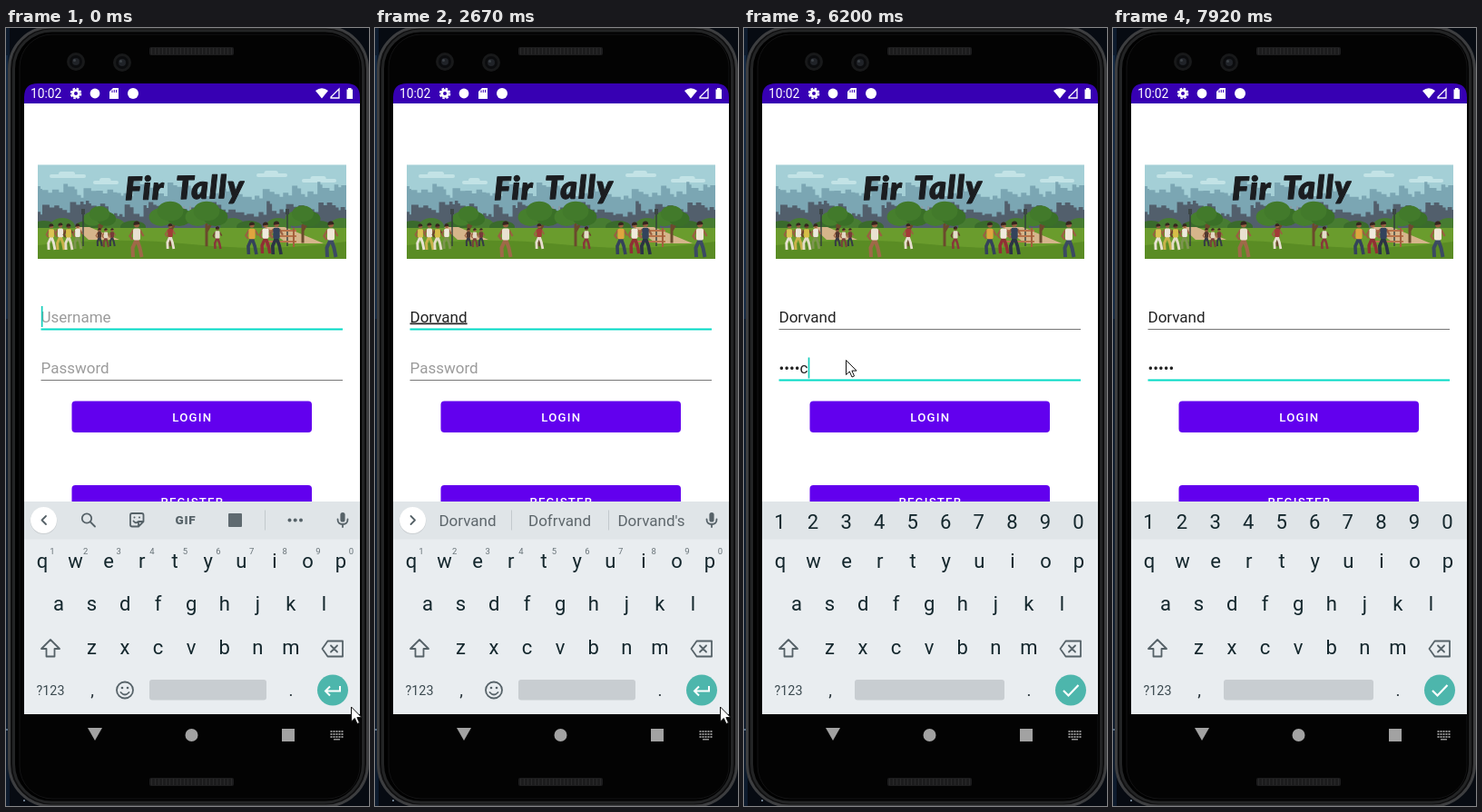
Write an HTML page that moves like this. It is 400 px wide and 856 px high and loops after 8 s.

```html
<!DOCTYPE html>
<html lang="en">
<head>
<meta charset="utf-8">
<title>Login screen</title>
<style>
  html, body { margin: 0; width: 100%; height: 100%; overflow: hidden; background: #05080d; }
  svg { display: block; width: 100vw; height: 100vh; font-family: Roboto, sans-serif; }
  text { white-space: pre; }
  .mid { text-anchor: middle; }
  .key { font-size: 22px; fill: #14272d; }
  .sup { font-size: 9.5px; fill: #687378; }
  .field { font-size: 17px; fill: #212121; }
  .hint { fill: #9b9b9b; }
  .word { font-size: 17px; fill: #5d666b; }
  .btn { font-size: 13.2px; font-weight: 500; letter-spacing: 1.2px; fill: #fff; }
  .line { fill: none; stroke: #566268; stroke-width: 1.8; stroke-linejoin: round; stroke-linecap: round; }
  .composing { text-decoration: underline; text-decoration-thickness: 1px; text-underline-offset: 1.5px; text-decoration-skip-ink: none; }
</style>
</head>
<body>
<svg id="stage" viewBox="0 0 400 856" preserveAspectRatio="none"></svg>
<script>
const LOOP = 8000;
const svg = document.getElementById('stage');

const rect = (x, y, w, h, fill, rx = 0, extra = '') =>
  `<rect x="${x}" y="${y}" width="${w}" height="${h}" rx="${rx}" fill="${fill}" ${extra}/>`;
const circle = (x, y, r, fill, extra = '') => `<circle cx="${x}" cy="${y}" r="${r}" fill="${fill}" ${extra}/>`;
const ellipse = (x, y, rx, ry, fill) => `<ellipse cx="${x}" cy="${y}" rx="${rx}" ry="${ry}" fill="${fill}"/>`;
const path = (d, fill, extra = '') => `<path d="${d}" fill="${fill}" ${extra}/>`;
const line = d => `<path class="line" d="${d}"/>`;
const text = (x, y, s, cls, extra = '') => `<text x="${x}" y="${y}" class="${cls}" ${extra}>${s}</text>`;
const group = (id, body) => `<g id="${id}">${body}</g>`;

function seeded(seed) {
  return () => (seed = (seed * 16807) % 2147483647) / 2147483647;
}

function phone() {
  const grille = y => {
    let s = rect(158, y, 93, 9, '#1c1c1d', 2);
    for (let x = 160; x < 250; x += 4) s += rect(x, y + 1, 1, 7, '#29292a');
    return s;
  };
  const camera = (x, y) =>
    circle(x, y, 10, '#18191a') + circle(x, y, 7, '#0b0c0e') + circle(x, y, 4, '#202328') +
    circle(x - 1.5, y - 1.5, 1.5, '#3c4147');
  const keys = [0, 1, 2].map(r => [0, 1, 2, 3, 4].map(c =>
    rect(357.5 + c * 3, 773 + r * 3, 2, 2, '#8f8f8f')).join('')).join('');
  return rect(0, 0, 400, 856, '#070b12') +
    rect(0, 0, 4, 856, '#0d1b2d') + rect(0, 30, 2, 290, '#142a45') +
    circle(20, 850, 1, '#8fa3b5') + circle(1, 772, 1, '#6f88a0') +
    rect(3.5, -1, 395, 857, '#0e0e0f', 46, 'stroke="#3d3e40" stroke-width="3"') +
    rect(8.5, 3, 385, 849, '#000', 42, 'stroke="#232425" stroke-width="3"') +
    rect(15, 7, 375, 841, '#030303', 36, 'stroke="#131314"') +
    grille(21) + grille(825) + camera(77, 37) + camera(128, 38) +
    path('M90 770H106L98 784Z', '#a2a2a2') + circle(204.5, 778, 7, '#a2a2a2') +
    rect(304, 771, 14, 14, '#a2a2a2') + keys + rect(361, 782, 7, 1.5, '#8f8f8f');
}

function statusBar() {
  return path('M20 83V76Q20 61 35 61H375Q390 61 390 76V83Z', '#3700b3') +
    text(27, 77, '10:02', '', 'font-size="13.8" fill="#fff"') +
    circle(77, 72, 3.4, 'none', 'stroke="#fff" stroke-width="2.8"') +
    circle(77, 72, 5.4, 'none', 'stroke="#fff" stroke-width="1.8" stroke-dasharray="2.6 1.64"') +
    circle(98, 72, 5.4, '#fff') +
    path('M118 66H124V78H114V70Z', '#fff') +
    path('M117 68.5V71M119.3 68V71M121.6 68V71', 'none', 'stroke="#3700b3"') +
    circle(140, 72, 6, '#fff') +
    path('M341 69Q348 63.5 355 69L348 77.5Z', '#fff') +
    path('M358 77V76L367 67V77Z', 'none', 'stroke="#fff" stroke-width="1.3"') +
    path('M375.5 67.5H377V66H380.5V67.5H382V78H375.5Z', '#fff');
}

function skyline(seed, top, vary, fill) {
  const rnd = seeded(seed);
  let d = 'M35 226', x = 35;
  while (x < 375) {
    const w = 5 + rnd() * 9, y = top + rnd() * vary;
    d += `L${x} ${y}H${x + w * 0.6}V${y + 3}H${x + w}`;
    x += w;
  }
  return path(d + 'V226Z', fill);
}

// Slim figure in mid-stride, sized in eighths of its height.
function person(x, foot, h, shirt, legs, skin = '#9a6041') {
  const u = h / 8;
  return path(`M${x} ${foot - u * 4}L${x - u * 0.9} ${foot - u * 2}L${x - u * 0.8} ${foot}M${x} ${foot - u * 4}L${x + u * 0.7} ${foot - u * 2}L${x + u * 1.1} ${foot}`,
      'none', `stroke="${legs}" stroke-width="${u * 0.8}"`) +
    path(`M${x - u * 0.7} ${foot - u * 6}L${x - u * 1.5} ${foot - u * 4.6}L${x - u * 0.9} ${foot - u * 3.8}M${x + u * 0.7} ${foot - u * 6}L${x + u * 1.5} ${foot - u * 4.6}`,
      'none', `stroke="${skin}" stroke-width="${u * 0.5}"`) +
    rect(x - u * 0.8, foot - u * 6.3, u * 1.6, u * 2.6, shirt, u * 0.4) +
    circle(x, foot - u * 7.1, u * 0.6, skin) +
    path(`M${x - u * 0.7} ${foot - u * 7}A${u * 0.7} ${u * 0.8} 0 0 1 ${x + u * 0.7} ${foot - u * 7.2}Z`, '#34251f');
}

function tree(x, y, r) {
  return path(`M${x} ${y}V${y + r * 1.9}M${x} ${y + r}L${x + r * 0.5} ${y + 2}`, 'none', 'stroke="#6b4a2c" stroke-width="3"') +
    ellipse(x - r * 0.55, y + 2, r * 0.75, r * 0.55, '#467f2d') + ellipse(x + r * 0.55, y + 2, r * 0.75, r * 0.55, '#3a7027') +
    ellipse(x, y - r * 0.25, r * 0.8, r * 0.6, '#427a2b');
}

function banner() {
  const lamp = x => path(`M${x} 203V240`, 'none', 'stroke="#333d3d" stroke-width="1.4"') + rect(x - 2, 199, 4, 6, '#3c4646');
  const rail = y => path(`M284 ${y}H320`, 'none', 'stroke="#b8734a" stroke-width="2"');
  const cloud = (x, y, w) => rect(x, y, w, 4, '#c3e3e6', 2) + rect(x + w * 0.25, y - 3, w * 0.45, 5, '#c3e3e6', 2.5);
  const hedge = [42, 62, 90, 118, 140, 250, 268, 300, 345, 370]
    .map((x, i) => ellipse(x, 219, 14, 7 + i % 2 * 3, i % 2 ? '#477c31' : '#3a6b2c')).join('');
  return '<clipPath id="art"><rect x="35" y="150.5" width="340" height="103.5"/></clipPath><g clip-path="url(#art)">' +
    rect(35, 150, 340, 76, '#a4cfd6') +
    cloud(48, 161, 40) + cloud(96, 168, 28) + cloud(276, 160, 34) + cloud(326, 166, 38) +
    skyline(71, 168, 18, '#7ba6b3') + skyline(29, 190, 15, '#525f6c') +
    hedge + rect(35, 220, 340, 35, '#6a9c2d') +
    path('M76 219H92L125 233H91ZM285 219H307L350 237H310Z', '#d6b58b') +
    path('M35 239Q120 229 205 238T375 235V254H35Z', '#5a8c24') +
    rect(195, 196, 2, 19, '#8a9aa4') + rect(202, 196, 2, 19, '#8a9aa4') +
    tree(103, 208, 14) + tree(181, 206, 18) + tree(221, 206, 18) + tree(327, 208, 15) +
    lamp(85) + lamp(310) + rail(223) + rail(229) + rail(235) +
    path('M287 220V241M317 220V241', 'none', 'stroke="#a45f3d" stroke-width="2"') +
    person(50, 244, 29, '#dcc453', '#e8e2d2') + person(60, 244, 30, '#ece6d8', '#c9b24a') +
    person(69, 244, 29, '#d8bd48', '#e4dcc6', '#6e432e') + person(79, 243, 28, '#eee9dd', '#7d9450') +
    person(103, 240, 20, '#51372f', '#353b45') + person(110, 241, 21, '#e2d8c4', '#793f3a') +
    person(117, 240, 20, '#783a39', '#343b45') +
    person(144, 252, 40, '#e9e0d0', '#9f6948') + person(181, 243, 28, '#a33b38', '#e7decf') +
    person(233, 243, 25, '#e5dccb', '#87383a', '#6e432e') +
    person(271, 249, 36, '#e0a53f', '#34425a') + person(286, 248, 35, '#f0eadd', '#8f3034') +
    person(298, 249, 37, '#33435c', '#2b3444') + person(358, 252, 40, '#f0e7d6', '#3b4a62') + '</g>' +
    `<g transform="rotate(-1 198 176)" font-family="Lato, sans-serif" font-weight="900" font-style="italic" font-size="35"
      fill="#1b1d20" stroke="#1b1d20" stroke-width="1" stroke-linejoin="round" letter-spacing="1.2">` +
    text(131, 188, 'Fir', '') + text(187, 188, 'Tally', '') + '</g>';
}

function form() {
  const button = (y, label) => rect(72.5, y, 264.5, 34.5, '#6200ee', 4) +
    text(205.3, y + 22.5, label, 'btn mid');
  return rect(20, 83, 370, 672, '#fff') + banner() +
    text(38.5, 323.5, 'Username', 'field hint', 'id="userHint"') + text(38.5, 323.5, '', 'field', 'id="user"') +
    text(38.5, 380, 'Password', 'field hint', 'id="passHint"') + text(38.5, 380, '', 'field', 'id="pass"') +
    rect(38.5, 330.5, 332.5, 2, '#03dac5', 0, 'id="userLine"') + rect(38.5, 387, 332.5, 1, '#777', 0, 'id="passLine"') +
    rect(39, 306, 1.7, 23, '#14cdbb', 0, 'id="caret"') +
    button(410.5, 'LOGIN') +
    '<clipPath id="press"><rect x="72.5" y="410.5" width="264.5" height="34.5" rx="4"/></clipPath>' +
    '<circle id="ripple" cx="147" cy="423" r="0" fill="#fff" opacity="0" clip-path="url(#press)"/>' +
    button(503, 'REGISTER');
}

const row = (chars, x, y, step = 36.55) =>
  [...chars].map((c, i) => text(x + i * step, y, c, 'key mid')).join('');

function keyboard() {
  const sups = [...'1234567890'].map((c, i) => text(51 + i * 36.6, 578.5, c, 'sup mid')).join('');
  const divider = x => rect(x, 530.5, 1, 22, '#c3c9cd');
  const tools = line('M44 537L39.5 541.5L44 546') +
    circle(89, 539.5, 5.2, 'none', 'class="line"') + line('M93 543.5L98 548.5') +
    line('M139 534H149.5Q151.5 534 151.5 536V543L146 548.5H139Q137 548.5 137 546.5V536Q137 534 139 534ZM151 543H146V548M140.5 542.5Q143 545.5 145 543.5') +
    circle(141.5, 538.5, 1, '#566268') + circle(147, 538.5, 1, '#566268') +
    text(198, 546, 'GIF', 'mid', 'font-size="13.5" font-weight="900" letter-spacing=".7" fill="#566268"') +
    rect(245, 534, 15, 15, '#5f6a70', 1) + divider(285) +
    [312.5, 318.7, 325].map(x => circle(x, 541.5, 2, '#566268')).join('');
  const words = line('M39.5 537L44 541.5L39.5 546') + divider(150) + divider(257) +
    [102, 203.5, 304.5].map((x, i) => text(x, 548, '', 'word mid', `id="word${i}"`)).join('');
  const mic = rect(368.4, 533, 5.2, 10.5, '#566268', 2.6) + line('M365.5 540.5Q365.5 546 371 546T376.5 540.5M371 546V549');
  const emoji = circle(131, 728.5, 9, 'none', 'class="line"') + circle(128, 726, 1.3, '#566268') +
    circle(134, 726, 1.3, '#566268') + line('M126.5 731Q131 736 135.5 731');
  return rect(20, 521, 370, 234, '#e9edf0') + rect(20, 521, 370, 41.5, '#e0e5e8') +
    group('strip', circle(41.5, 542.3, 14.8, '#00000018') + circle(41.5, 541.5, 14.5, '#fff') +
      group('tools', tools) + group('words', words) + mic) +
    group('digits', row('1234567890', 39.5, 550.5)) +
    row('qwertyuiop', 40, 593.5) + row('asdfghjkl', 58, 641) + row('zxcvbnm', 94.5, 688.5) +
    line('M49 673L59 683H53.5V691.5H44.5V683H39Z') +
    line('M354.5 674.5H371V691.5H354.5L348.5 683ZM358 679.5L365 686.5M365 679.5L358 686.5') +
    text(49, 733.5, '?123', 'mid', 'font-size="14.3" fill="#3c4a50"') +
    text(95, 735, ',', 'mid', 'font-size="19" fill="#263238"') + text(314, 735, '.', 'mid', 'font-size="19" fill="#263238"') +
    rect(158, 717, 129, 22.5, '#c8cdd1', 3, 'id="space"') + circle(360, 728.5, 17, '#4db6ac') +
    group('plain', sups + emoji +
      path('M368 724V729.5H352M357 724.5L352 729.5L357 734.5', 'none', 'stroke="#fff" stroke-width="2"')) +
    path('M352 729L357.5 734.5L368.5 723', 'none', 'stroke="#fff" stroke-width="2.2" id="check"');
}

const pointer = path('M0 0V16L3.8 12.5L6.5 18.5L9 17.4L6.4 11.6H11.5Z', '#fff',
  'stroke="#111" stroke-linejoin="round" id="pointer"');

svg.innerHTML = phone() + form() + statusBar() + keyboard() + pointer;
const el = {};
svg.querySelectorAll('[id]').forEach(n => el[n.id] = n);

const typed = [[0, ''], [450, 'D'], [840, 'Do'], [1110, 'Dor'], [1390, 'Dorv'], [1640, 'Dorva'], [1950, 'Dorvan'], [2100, 'Dorvand']];
const suggestions = [[0, ['', '', '']], [570, ['D', 'Do', 'Did']], [840, ['Do', 'Don’t', 'Dot']],
  [1110, ['Dor', 'Door', 'Dorm']], [1390, ['Dorv', 'Dorvand', 'Dorvs']], [1640, ['Dorva', 'Dorvand', 'Dorvay']],
  [2100, ['Dorvand', 'Dofrvand', "Dorvand's"]]];
const secret = [[0, ''], [5110, 'm'], [5380, '•a'], [5680, '••n'], [6080, '•••o'], [6200, '••••c'], [7660, '•••••']];
const blink = [[0, 1], [2670, 0], [3130, 1], [3740, 0], [4190, 1], [4710, 0], [5110, 1], [6790, 0], [7080, 1], [7790, 0]];
const mouse = [[0, [380.5, 747]], [3280, [330, 650]], [3430, [205, 450]], [3890, [150, 400]], [4040, [112.5, 365.5]],
  [7080, [128, 394]], [7230, [142.5, 419.5]], [7920, null]];
const ripple = [[0, [0, 0]], [7530, [45, 0.2]], [7660, [130, 0.22]], [7790, [230, 0.12]], [7920, [0, 0]]];

function at(steps, t) {
  let value;
  for (const [start, v] of steps) if (t >= start) value = v;
  return value;
}
const show = (node, on) => node.setAttribute('visibility', on ? 'inherit' : 'hidden');
function set(node, attrs) {
  for (const k in attrs) node.setAttribute(k, attrs[k]);
}
const underline = (node, y, active) =>
  set(node, { y: active ? y : y + 0.5, height: active ? 2 : 1, fill: active ? '#03dac5' : '#777' });

function render(t) {
  const onPass = t >= 4190, numeric = t >= 4310, suggest = t >= 570;
  const user = at(typed, t), pass = at(secret, t), words = at(suggestions, t);

  el.user.textContent = user;
  el.user.classList.toggle('composing', !onPass);
  el.pass.textContent = pass;
  show(el.userHint, !user);
  show(el.passHint, !pass);
  underline(el.userLine, 330.5, !onPass);
  underline(el.passLine, 386.5, onPass);

  const active = onPass ? el.pass : el.user;
  const width = active.textContent ? active.getComputedTextLength() : 0;
  set(el.caret, { x: 38.8 + width, y: onPass ? 362.5 : 306 });
  show(el.caret, at(blink, t));

  words.forEach((w, i) => {
    const node = el['word' + i], bold = i === 1 && t < 2100;
    node.textContent = w;
    set(node, { style: bold ? 'font-weight:700;fill:#111' : '' });
  });
  show(el.strip, !numeric);
  show(el.tools, !suggest);
  show(el.words, suggest);
  show(el.digits, numeric);
  show(el.plain, !numeric);
  show(el.check, numeric);
  set(el.space, { x: numeric ? 122 : 158, width: numeric ? 165 : 129 });

  const [r, opacity] = at(ripple, t);
  set(el.ripple, { r, opacity });
  const pos = at(mouse, t);
  show(el.pointer, pos);
  if (pos) set(el.pointer, { transform: `translate(${pos})` });
}

const begin = performance.now();
function frame() {
  render((performance.now() - begin) % LOOP);
  requestAnimationFrame(frame);
}
frame();
</script>
</body>
</html>
```
